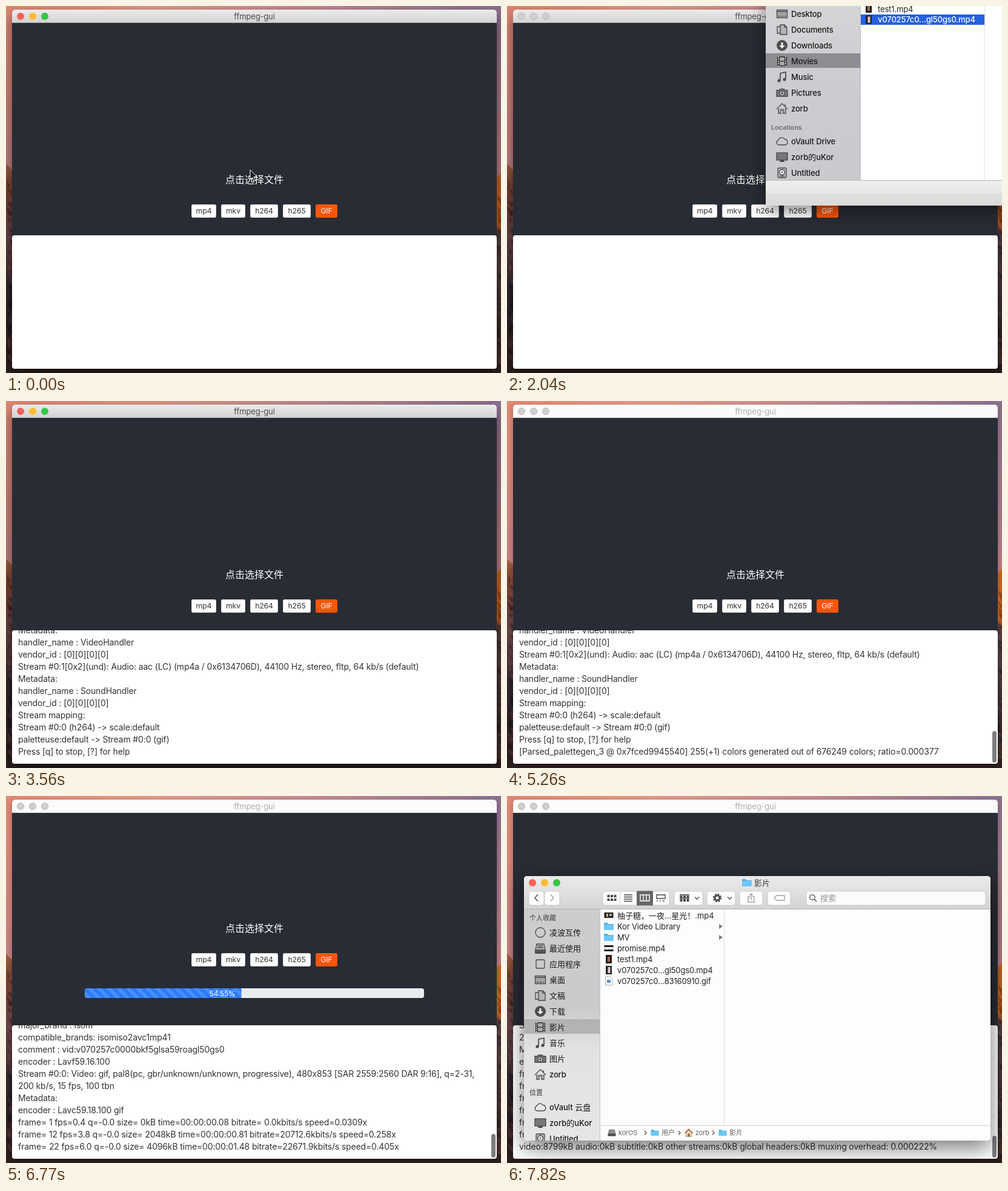
An HTML page that plays this animation: 817 px wide and 605 px high, repeating every 8000 ms.

```html
<!DOCTYPE html>
<html lang="zh">
<head>
<meta charset="utf-8">
<title>ffmpeg-gui</title>
<style>
html, body { margin: 0; width: 100%; height: 100%; overflow: hidden; }
svg { display: block; }
text { font-family: Inter, "Noto Sans CJK SC", "Noto Sans CJK", sans-serif; white-space: pre; }
.latin { letter-spacing: -.15px; }
</style>
</head>
<body>
<svg id="stage" width="817" height="605" viewBox="0 0 817 605"></svg>
<script>
const LOOP = 8000;
const $ = id => document.getElementById(id);
const rect = (x, y, w, h, fill, extra = '') =>
  `<rect x="${x}" y="${y}" width="${w}" height="${h}" fill="${fill}" ${extra}/>`;
const path = (d, fill = 'none', extra = '') => `<path d="${d}" fill="${fill}" ${extra}/>`;
const circle = (x, y, r, fill, extra = '') => `<circle cx="${x}" cy="${y}" r="${r}" fill="${fill}" ${extra}/>`;
const group = (id, body, extra = '') => `<g id="${id}" ${extra}>${body}</g>`;
// y is the vertical middle of the line; the baseline sits on a whole pixel
const text = (x, y, s, { size = 13, fill = '#222', weight = 400, anchor = 'start', id = '' } = {}) =>
  `<text ${id && `id="${id}"`} x="${x}" y="${Math.round(y + size * .36)}" font-size="${size}" fill="${fill}"
    font-weight="${weight}" text-anchor="${anchor}" ${/[一-龥]/.test(s) ? '' : 'class="latin"'}>${s}</text>`;
const grad = (id, horizontal, ...stops) =>
  `<linearGradient id="${id}" x2="${+horizontal}" y2="${1 - horizontal}">${stops.map(([o, c]) =>
    `<stop offset="${o}" stop-color="${c}"/>`).join('')}</linearGradient>`;
const clip = (id, shape) => `<clipPath id="${id}">${shape}</clipPath>`;
const line = 'stroke="#48484b" stroke-width="1.3"';

const icons = {
  ring: circle(0, 0, 8, 'none', line),
  square: rect(-7, -7, 14, 14, 'none', line + ' rx="2"'),
  tray: path('M-6-7H6L8 3V8H-8V3Z', '#b5b5b8', line) + path('M-8 3H8V8H-8ZM-4-4H4M-5-1H5', '#58585b', line),
  desktop: rect(-8.5, -6.5, 17, 13, '#a4a4a7', line) + path('M-8-4H8M-6 4H-3M-1 4H2M4 4H6', 'none', line),
  pages: path('M-8-5H-1V6H-8Z', '#c4c4c6', line) + path('M-3-8H4L8-4V8H-3ZM4-8V-4H8', '#b3b3b6', line),
  down: circle(0, 0, 9, '#4d4d50') + path('M-1.5-5H1.5V0H5L0 5-5 0H-1.5Z', '#eee'),
  film: rect(-8, -8, 16, 16, '#2c2c2e') + rect(-4, -6.5, 8, 6, '#aaa') + rect(-4, .8, 8, 6, '#aaa') +
    path('M-6-8V8M6-8V8', 'none', 'stroke="#ccc" stroke-width="2" stroke-dasharray="2 1.6"'),
  note: path('M-3 5V-6L6-8V3', 'none', 'stroke="#48484b" stroke-width="1.7"') +
    circle(-5, 6, 2.6, '#48484b') + circle(4, 4, 2.6, '#48484b'),
  camera: path('M-9-4H-5L-3-6H3L5-4H9V6H-9Z', '#77777a', line) + circle(0, 1, 4, '#c9c9cb', line) + circle(0, 1, 1.8, '#48484b'),
  home: path('M-6 0V8H-2V2H2V8H6V0', '#b5b5b8', line) + path('M-9 1L0-8 9 1M5-7V-3', 'none', line),
  house: path('M-6 0V8H6V0L0-6Z', '#e9d9b8', 'stroke="#a08560"') + rect(-2, 2, 4, 6, '#8a6440') +
    path('M-8 1L0-7 8 1', 'none', 'stroke="#b9502f" stroke-width="2"'),
  cloud: path('M-5 6a4 4 0 0 1-1-7.8A5.5 5.5 0 0 1 4-3.5A4.8 4.8 0 0 1 5 6Z', 'none', line),
  screen: rect(-9, -7, 18, 12, '#77777a', line) + path('M-3 5H3L4 8H-4Z', '#48484b'),
  disk: rect(-7, -8, 14, 16, '#b5b5b8', line + ' rx="2"') + circle(0, -1, 4.5, '#ddd', line) +
    circle(0, -1, 1, '#48484b') + path('M-4 5.5H4', 'none', line),
  drive: path('M-6-7H6L8 2V7H-8V2Z', '#8d8d90') + rect(-8, 2, 16, 5, '#4c4c4f'),
  folder: path('M-8-6H-2L-1-4H8V6H-8Z', '#4fb0e8') + rect(-8, -3, 16, 9, '#6dc7f5'),
  wide: rect(-7.5, -5, 15, 9, '#29231f') + rect(-4, -3, 3, 5, '#d6b78d') + rect(1, -3, 4, 4, '#a9a3a0'),
  strip: rect(-7.5, -5, 15, 10, '#1c1c1c') + rect(-7.5, -2, 15, 4, '#f1f1f1'),
  tall: rect(-5, -7, 10, 14, '#1d1a1c') + rect(-2, -4, 4, 8, '#a46c52'),
  tall2: rect(-5, -7, 10, 14, '#292329') + rect(-1.5, -5, 4, 10, '#d8cbc6'),
  image: path('M-5.5-7H3L6-4V7H-5.5Z', '#fff', 'stroke="#aaa"') + rect(-3, -2, 6, 5, '#5e8fc4'),
};
const icon = (name, x, y, scale = 1) => `<g transform="translate(${x} ${y}) scale(${scale})">${icons[name]}</g>`;

const sidebar = (x, y, items) => items.map(([name, label], i) =>
  icon(name, x - 15, y + i * 26) + text(x, y + i * 26, label, { fill: '#1a1a1a', weight: 500 })).join('');

const lights = (x, y) => ['#fc605b', '#fdbc2f', '#34c749'].map((c, i) => circle(x + i * 20, y, 6, c)).join('');

function wallpaper() {
  let seed = 7;
  const rnd = () => (seed = seed * 16807 % 2147483647) / 2147483647;
  let rocks = '';
  for (let y = 285; y < 605; y += 9) for (const x of [0, 808]) {
    const w = 4 + rnd() * 9, h = 6 + rnd() * 14;
    rocks += path(`M${x + rnd() * 5} ${y}l${w} ${h / 2} ${-w / 2} ${h / 2}z`, rnd() < .5 ? '#0004' : '#a0604533');
  }
  return rect(0, 0, 817, 605, 'url(#sky)') +
    rect(0, 0, 10, 300, 'url(#haze)') + rect(808, 0, 9, 300, 'url(#haze)') +
    path('M0 260L10 270V605H0Z', 'url(#cliffLeft)') +
    path('M808 285L817 276V605H808Z', 'url(#cliffRight)') + rocks +
    rect(0, 590, 817, 15, '#2f1f21');
}

const buttons = [['mp4', 306, 41], ['mkv', 355, 40], ['h264', 403, 46], ['h265', 457, 46], ['GIF', 511, 36]]
  .map(([label, x, w]) => {
    const on = label === 'GIF';
    return rect(x + .5, 327.5, w - 1, 21, on ? '#f9560b' : '#fff', `rx="2" stroke="${on ? '#f9560b' : '#dcdcdc'}"`) +
      text(x + w / 2, 338, label, { size: 12.3, fill: on ? '#fff' : '#333', anchor: 'middle' });
  }).join('');

const appWindow =
  rect(10, 6, 800, 592, '#282c34', 'id="frame" rx="5"') +
  path('M10 28V11a5 5 0 0 1 5-5H805a5 5 0 0 1 5 5V28Z', 'url(#chrome)', 'id="titleBar"') +
  rect(10, 27, 800, 1, '#0003') +
  group('lights', lights(24, 17)) +
  group('dimLights', [24, 44, 64].map(x => circle(x, 17, 5.6, '#cfcfcf', 'stroke="#b8b8b8"')).join('')) +
  text(410, 17, 'ffmpeg-gui', { fill: '#4b4b4b', anchor: 'middle', id: 'title' }) +
  group('controls', text(410, 286, '点击选择文件', { size: 16, fill: '#fff', anchor: 'middle' }) + buttons) +
  group('progress', rect(130, 317, 560, 16, '#e9ecef') + rect(130, 317, 0, 16, '#2a7bff', 'id="fill"') +
    rect(130, 317, 0, 16, 'url(#stripes)', 'id="fillStripes"'), 'clip-path="url(#barClip)"') +
  text(0, 325.5, '0%', { size: 12, fill: '#fff', anchor: 'end', id: 'percent' }) +
  rect(10, 378, 800, 220, '#fff', 'rx="4"') +
  group('log', '', 'clip-path="url(#logClip)"') +
  rect(801, 543, 7, 53, '#7d7d7d', 'id="thumb" rx="3.5"');

const dialog =
  rect(427, -20, 440, 349, '#e4e4e4', 'style="filter:drop-shadow(0 8px 14px #0007)"') +
  rect(427, -20, 156, 308, 'url(#side)') + rect(583, -20, 300, 308, '#fff') +
  rect(583, 0, 1, 288, '#c0c0c2') + rect(788, 0, 1, 288, '#e2e2e2') +
  rect(427, 287, 400, 1, '#b8b8b8') + rect(427, 288, 400, 41, 'url(#foot)') +
  rect(427, 78, 156, 24, '#8c8e93') +
  sidebar(469, 13, [['desktop', 'Desktop'], ['pages', 'Documents'], ['down', 'Downloads'], ['film', 'Movies'],
    ['note', 'Music'], ['camera', 'Pictures'], ['home', 'zorb']]) +
  text(436, 200, 'Locations', { size: 11, fill: '#6d6d70', weight: 600 }) +
  sidebar(469, 223, [['cloud', 'oVault Drive'], ['screen', 'zorb的uKor'], ['disk', 'Untitled']]) +
  icon('tall', 597, 4) + text(612, 5, 'test1.mp4') +
  rect(584, 14, 204, 17, '#2560df', 'id="selection"') +
  icon('tall2', 597, 22.5) + text(612, 22.5, 'v070257c0…gl50gs0.mp4', { id: 'picked' });

const button = (x, w) => rect(x, 157, w, 23, '#fcfcfc', 'rx="4" stroke="#c2c2c2" stroke-width=".8"');
const glyph = (d, color = '#4a4a4a') => path(d, 'none', `stroke="${color}" stroke-width="1.4"`);
const tiles = (x, y) => [0, 6].map(dy => [0, 5.5, 11].map(dx =>
  rect(x + dx, y + dy, 4, 4, '#4a4a4a')).join('')).join('');
const files = [['wide', '柚子糖，一夜…星光！.mp4'], ['folder', 'Kor Video Library'], ['folder', 'MV'], ['strip', 'promise.mp4'],
  ['tall', 'test1.mp4'], ['tall2', 'v070257c0…gl50gs0.mp4'], ['image', 'v070257c0…83160910.gif']];
const crumbs = [['drive', 173, 'korOS'], ['folder', 244, '用户'], ['house', 300, 'zorb'], ['folder', 356, '影片']];

const finder =
  rect(28, 132, 770, 436, '#fdfdfd', 'rx="5" style="filter:drop-shadow(0 12px 18px #0008)"') +
  group('finderBody',
    rect(28, 132, 770, 55, 'url(#chrome)') + rect(28, 186, 770, 1, '#b4b4b4') +
    lights(42, 143) + icon('folder', 396, 143) + text(408, 143, '影片', { fill: '#3c3c3c' }) +
    button(36, 25) + button(62, 25) + glyph('M51 162.5L46 168 51 173.5') + glyph('M72 162.5L77 168 72 173.5', '#a0a0a0') +
    button(158, 110) + rect(214, 156.5, 27, 24, '#666') + rect(186, 157, .8, 23, '#ccc') +
    tiles(165.5, 163) + glyph('M193 163H207M193 166.5H207M193 170H207M193 173.5H207') +
    glyph('M220 163H235V173H220ZM225 163V173M230 163V173', '#fff') +
    glyph('M247 163H261V169H247ZM247 173H249M252 173H254M257 173H260') +
    button(276, 47) + glyph('M285 162.7H301M285 168.7H301') + tiles(285.5, 164) + glyph('M310 166.5L313.5 170 317 166.5') +
    button(330, 47) + circle(347, 168, 4, 'none', 'stroke="#4a4a4a" stroke-width="3"') +
    circle(347, 168, 6, 'none', 'stroke="#4a4a4a" stroke-width="2.4" stroke-dasharray="2.4 2.31"') +
    glyph('M364 166.5L367.5 170 371 166.5') +
    button(384, 38) + glyph('M401 166H398V175H408V166H405M403 171V161M400 164L403 161 406 164', '#a3a3a3') +
    button(430, 38) + glyph('M441 168L445 164H458V172H445Z', '#a3a3a3') +
    button(494, 296) + circle(504, 167, 4.2, 'none', 'stroke="#555" stroke-width="1.3"') + glyph('M507 170L511 174') +
    text(517, 168, '搜索', { fill: '#929292' }) +
    rect(28, 187, 125, 381, 'url(#finderSide)') + rect(153, 187, 1, 381, '#c4c4c4') + rect(358, 187, 1, 356, '#dedede') +
    rect(28, 368, 125, 24, '#b3b3b5') +
    text(37, 201, '个人收藏', { size: 11, fill: '#6b6b6e', weight: 700 }) +
    sidebar(70, 225, [['ring', '凌波互传'], ['tray', '最近使用'], ['square', '应用程序'], ['desktop', '桌面'], ['pages', '文稿'],
      ['down', '下载'], ['film', '影片'], ['note', '音乐'], ['camera', '图片'], ['home', 'zorb']]) +
    text(37, 489, '位置', { size: 11, fill: '#6b6b6e', weight: 700 }) +
    sidebar(70, 513, [['cloud', 'oVault 云盘'], ['screen', 'zorb的uKor'], ['disk', 'Untitled']]) +
    files.map(([name, label], i) => icon(name, 168, 197 + i * 18) + text(182, 197 + i * 18, label) +
      (name === 'folder' ? path(`M350 ${193 + i * 18}l6 4-6 4z`, '#7a7a7a') : '')).join('') +
    rect(154, 543, 644, 1, '#d0d0d0') +
    crumbs.map(([name, x, label], i) => icon(name, x, 555, .8) +
      text(x + 11, 555, label, { size: 11, fill: '#666' }) +
      (i ? glyph(`M${x - 17} 552l3 3.2-3 3.2`, '#555') : '')).join(''),
    'clip-path="url(#finderClip)"');

$('stage').innerHTML = '<defs>' +
  grad('sky', 1, [0, '#e28873'], [.3, '#e39a88'], [.65, '#c08a92'], [1, '#8b7190']) +
  grad('haze', 0, [0, '#c9808000'], [1, '#c07f84']) +
  grad('cliffLeft', 0, [0, '#a5613f'], [.12, '#7a4032'], [.35, '#644146'], [.6, '#35272f'], [1, '#2f1e1f']) +
  grad('cliffRight', 0, [0, '#c9691f'], [.25, '#d9631d'], [.3, '#573f45'], [.65, '#382b32'], [1, '#3f2825']) +
  grad('chrome', 0, [0, '#ebebeb'], [1, '#d3d3d3']) +
  grad('side', 0, [0, '#d6d6d8'], [.5, '#cbccd0'], [1, '#c9cace']) +
  grad('foot', 0, [0, '#efefef'], [.5, '#e6e6e6'], [.52, '#dfdfdf'], [1, '#dadada']) +
  grad('finderSide', 0, [0, '#cdcdcf'], [.42, '#cacacc'], [.6, '#e2e2e3'], [1, '#e6e6e6']) +
  `<pattern id="stripes" width="16" height="16" patternUnits="userSpaceOnUse">${
    path('M0 8V16H8ZM0 0H8L16 8V16Z', '#ffffff26')}</pattern>` +
  clip('barClip', rect(130, 317, 560, 16, '#000', 'rx="4"')) +
  clip('logClip', rect(10, 378, 800, 220, '#000')) +
  clip('finderClip', rect(28, 132, 770, 436, '#000', 'rx="5"')) + '</defs>' +
  wallpaper() + appWindow + group('dialog', dialog) +
  group('cursor', path('M0 0V16L3.7 12.6 6.2 18.6 8.7 17.6 6.2 11.6H11.2Z', '#16181c', 'stroke="#fff"')) +
  group('finder', finder);

const logLines = `Metadata:
handler_name : VideoHandler
vendor_id : [0][0][0][0]
Stream #0:1[0x2](und): Audio: aac (LC) (mp4a / 0x6134706D), 44100 Hz, stereo, fltp, 64 kb/s (default)
Metadata:
handler_name : SoundHandler
vendor_id : [0][0][0][0]
Stream mapping:
Stream #0:0 (h264) -> scale:default
paletteuse:default -> Stream #0:0 (gif)
Press [q] to stop, [?] for help
[Parsed_palettegen_3 @ 0x7fced9945540] 255(+1) colors generated out of 676249 colors; ratio=0.000377
Output #0, gif, to '/Users/zorb/Movies/v070257c0000bkf5glsa59roagl50gs0_83160910.gif':
Metadata:
major_brand : isom
compatible_brands: isomiso2avc1mp41
comment : vid:v070257c0000bkf5glsa59roagl50gs0
encoder : Lavf59.16.100
Stream #0:0: Video: gif, pal8(pc, gbr/unknown/unknown, progressive), 480x853 [SAR 2559:2560 DAR 9:16], q=2-31,
200 kb/s, 15 fps, 100 tbn
Metadata:
encoder : Lavc59.18.100 gif
frame= 1 fps=0.4 q=-0.0 size= 0kB time=00:00:00.08 bitrate= 0.0kbits/s speed=0.0309x
frame= 12 fps=3.8 q=-0.0 size= 2048kB time=00:00:00.81 bitrate=20712.6kbits/s speed=0.258x
frame= 22 fps=6.0 q=-0.0 size= 4096kB time=00:00:01.48 bitrate=22671.9kbits/s speed=0.405x
frame= 32 fps=7.6 q=-0.0 size= 6144kB time=00:00:02.14 bitrate=23519.5kbits/s speed=0.51x
frame= 43 fps=9.1 q=-0.0 size= 8192kB time=00:00:02.88 bitrate=23301.7kbits/s speed=0.612x
frame= 44 fps=9.1 q=-0.0 Lsize= 8799kB time=00:00:02.94 bitrate=24516.2kbits/s speed=0.608x
video:8799kB audio:0kB subtitle:0kB other streams:0kB global headers:0kB muxing overhead: 0.000222%`.split('\n');

// time, visible lines, scroll thumb top
const logSteps = [[0, 0, 543], [2760, 11, 543], [5260, 12, 544], [5440, 23, 555], [5980, 24, 556],
  [6540, 25, 557], [7020, 26, 558], [7540, 27, 559], [7650, 29, 560]];
const barSteps = [[5980, 29.86], [6540, 54.55], [7020, 78.88], [7540, 100]];
const cursorPath = [[80, 403, 270], [260, 383, 283], [720, 383, 283], [1050, 690, 95], [1180, 742, 40],
  [1320, 627, 20], [1800, 627, 20], [2030, 795, 61]];

const clamp = v => Math.min(1, Math.max(0, v));
function ease(p) { // cubic-bezier(.25, .1, .25, 1)
  let lo = 0, hi = 1;
  for (let i = 0; i < 20; i++) {
    const u = (lo + hi) / 2, x = .75 * u * (1 - u) + u ** 3;
    if (x < p) lo = u; else hi = u;
  }
  return .3 * lo * (1 - lo) ** 2 + 3 * lo * lo * (1 - lo) + lo ** 3;
}
function cursorAt(t) {
  const i = cursorPath.findIndex(k => k[0] > t);
  if (i <= 0) return cursorPath[i < 0 ? cursorPath.length - 1 : 0].slice(1);
  const [t0, x0, y0] = cursorPath[i - 1], [t1, x1, y1] = cursorPath[i], p = (t - t0) / (t1 - t0);
  return [x0 + (x1 - x0) * p, y0 + (y1 - y0) * p];
}
const set = (id, attrs) => { for (const k in attrs) $(id).setAttribute(k, attrs[k]); };
const show = (id, on) => $(id).style.display = on ? '' : 'none';

let shownLines = -1;
function drawLog(t) {
  const [, count, top] = logSteps.findLast(s => s[0] <= t);
  if (count !== shownLines) {
    shownLines = count;
    $('log').innerHTML = logLines.slice(Math.max(0, count - 11), count).map((s, i) =>
      text(20, 378 + i * 20, s, { size: 14, fill: '#333' })).join('');
  }
  const opacity = t < 2760 ? 0 : t < 5260 ? 1 - clamp((t - 3310) / 250) : 1;
  set('thumb', { y: top, height: 596 - top, opacity });
}
function drawProgress(t) {
  const on = t >= 5980 && t < 7650;
  show('progress', on);
  show('percent', on);
  set('controls', { transform: `translate(0 ${on ? -68 : 0})` });
  if (!on) return;
  let value = barSteps[0][1], label = value;
  barSteps.forEach(([start, goal], i) => {
    if (!i || t < start) return;
    const end = Math.min(t, barSteps[i + 1]?.[0] ?? t);
    value += (goal - value) * ease(clamp((end - start) / 600));
    label = goal;
  });
  const width = 5.6 * value;
  set('fill', { width });
  set('fillStripes', { width });
  set('stripes', { patternTransform: `translate(${2 - (t - 5980) * .016 % 16} 13)` });
  set('percent', { x: 120 + width });
  $('percent').textContent = label.toFixed(2) + '%';
}

function draw(t) {
  const active = t < 4550, sheet = t >= 520 && t < 2760, selected = t >= 1500;
  show('lights', active && !sheet);
  show('dimLights', !active || sheet);
  set('titleBar', { fill: active ? 'url(#chrome)' : '#fbfbfb' });
  set('title', { fill: active ? '#4b4b4b' : '#b0b0b0' });
  $('frame').style.filter = `drop-shadow(0 ${active ? '10px 12px #0008' : '3px 5px #0004'})`;

  show('dialog', t >= 520 && t < 2850);
  set('dialog', { opacity: sheet ? 1 : .4 });
  show('selection', selected);
  set('picked', { fill: selected ? '#fff' : '#222', 'font-weight': selected ? 500 : 400 });

  show('cursor', t < 2040);
  set('cursor', { transform: `translate(${cursorAt(t)})` });

  drawLog(t);
  drawProgress(t);

  show('finder', t >= 7730);
  set('finder', { opacity: t < 7820 ? .5 : 1 });
}

function tick() {
  draw(performance.now() % LOOP);
  requestAnimationFrame(tick);
}
tick();
</script>
</body>
</html>
```
